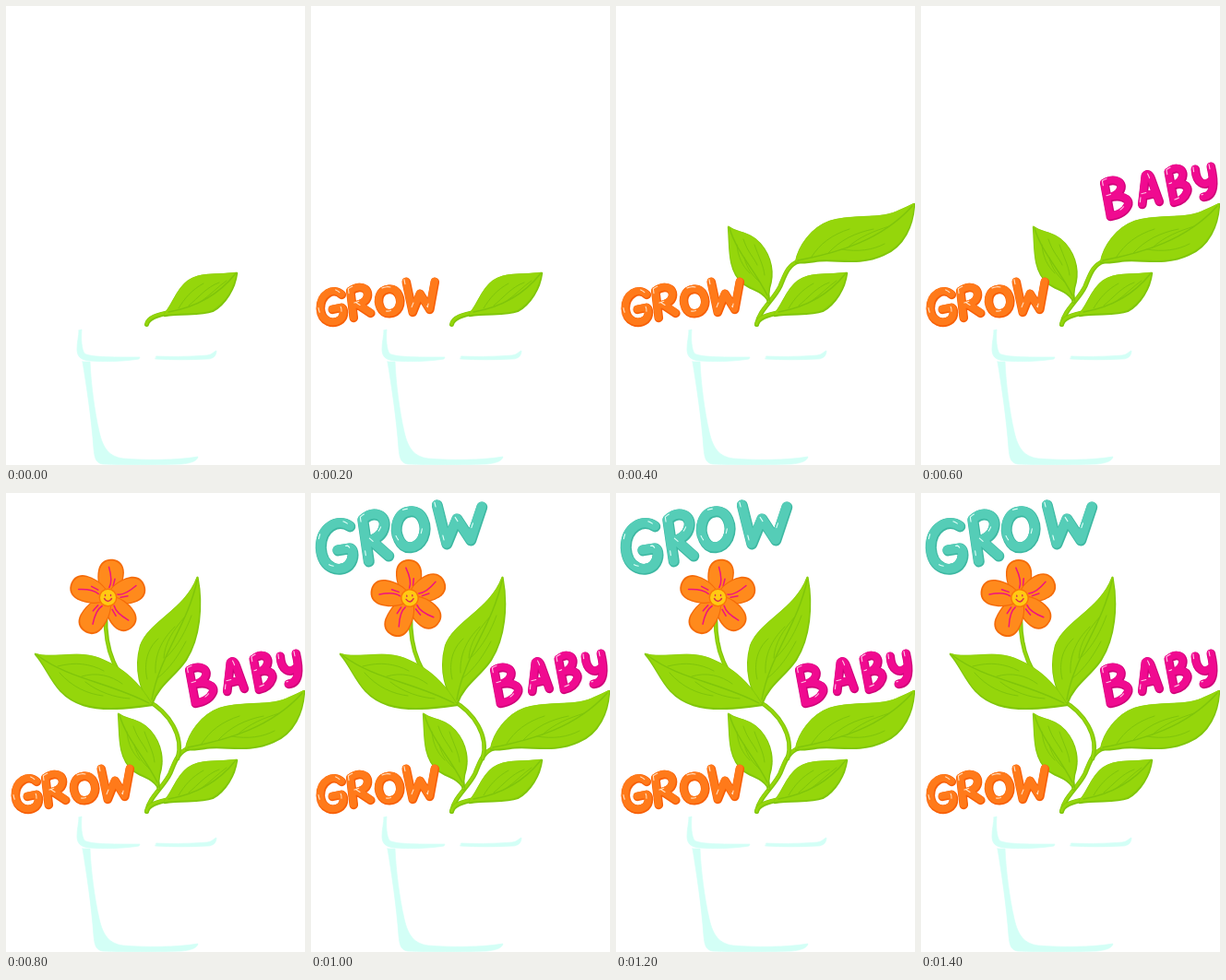
Animation of 324x498 px, one loop 1.6 s. Source, as an HTML page:

```html
<!DOCTYPE html>
<html lang="en">
<head>
<meta charset="utf-8">
<title>Grow baby grow</title>
<style>
html, body { margin: 0; height: 100%; overflow: hidden; background: #fff; }
svg { display: block; width: 100vw; height: 100vh; }
path { stroke-linecap: round; stroke-linejoin: round; }
</style>
</head>
<body>
<svg id="stage" viewBox="0 0 324 498"></svg>
<script>
const LOOP = 1600, STEP = 200;
const GREEN = '#95d60b', SHADE = '#7fc50a', GLASS = '#d3fff6';

// Filled shape with an optional outline of the same colour
const fill = (d, color, edge = 0, extra = '') =>
  `<path d="${d}" fill="${color}" stroke="${color}" stroke-width="${edge}" ${extra}/>`;
const line = (d, color, width, extra = '') =>
  `<path d="${d}" fill="none" stroke="${color}" stroke-width="${width}" ${extra}/>`;
const group = (at, body) => `<g data-at="${at}">${body}</g>`;

const stem = (d, width = 5) =>
  line(d, SHADE, width) + line(d, GREEN, width - 2, 'transform="translate(-.3 -.4)"');

const leaf = (shape, rib, veins) =>
  fill(shape, SHADE, 2.4) +
  fill(shape, GREEN, 0.4, 'transform="translate(-.3 -.9)"') +
  line(rib, SHADE, 1.4) + line(veins, SHADE, 1);

// Puffy lettering: dark edge, bright body, sparse highlight
const letters = (d, width, edge, body, shine) =>
  line(d, edge, width, 'transform="translate(.3 .4)"') +
  line(d, body, width - 1.8, 'transform="translate(-.2 -.4)"') +
  line(d, shine, 1.1, `stroke-dasharray="5 32" transform="translate(${-width * .22} ${-width * .24})"`);

const pot =
  fill('M79 352L82 351C81 362 82 372 85 377C91 381 112 381 145 381L144 383C125 386 105 386 91 385C80 384 77 380 77 372C77 364 79 358 79 352Z', GLASS, 0.7) +
  fill('M163 380C185 381 205 380 218 379C224 378 225 375 228 374C228 379 225 383 218 383C200 384 180 384 162 383Z', GLASS, 0.7) +
  fill('M83 386L91 386C92 410 96 440 101 462C105 480 112 489 127 491C150 493 185 493 208 489C207 494 200 496 190 497C160 498 130 498 105 497C97 496 96 490 95 480C93 450 87 410 83 386Z', GLASS, 0.7);

const lowRight =
  stem('M152.500 345.500C154 338 164 335 178 332.500') +
  leaf('M173 333C181 324 185 308 197 299C211 289 227 293 250 290C248 306 238 323 224 331C211 336 194 333 172 336Z',
    'M176 332C205 327 230 314 249 290',
    'M187 328C193 318 201 308 214 301M198 325C208 317 217 305 231 300M212 320C222 313 229 305 239 298');

const lowLeft = leaf(
  'M122 240C130 247 145 245 156 258C169 273 171 291 166 306L164.500 319C158 308 146 308 137 300C121 286 124 261 122 240Z',
  'M123 241C131 268 151 287 164 314',
  'M131 259C132 272 137 282 145 290M138 253C143 268 149 272 153 281M150 259C155 273 160 282 161 292M139 273C142 286 149 293 156 300');

const midRight = leaf(
  'M195 278C198 261 212 241 232 234C257 226 289 233 308 222C315 219 319 217 323 215C322 238 312 261 290 270C262 283 236 273 215 277C206 278 200 279 195 278Z',
  'M197 276C240 268 288 254 321 217',
  'M212 272C221 258 234 248 253 242M230 268C243 254 259 246 279 242M251 262C264 250 280 244 296 239M245 264C262 267 278 265 291 258');

const topRight = leaf(
  'M207.500 92C213 122 210 157 195 181C183 199 166 207 158 229C146 217 139 191 146 166C155 140 195 127 207.500 92Z',
  'M207 95C197 143 166 177 158 224',
  'M153 202C149 185 153 169 165 158M162 195C161 176 168 160 183 145M171 179C172 163 181 149 194 134M164 201C178 190 187 176 195 161M174 178C187 165 195 149 201 133');

const topLeft = leaf(
  'M32 175C50 182 80 169 106 182C132 193 147 211 158 230C135 233 107 237 84 230C52 220 48 193 32 175Z',
  'M34 176C68 202 111 205 155 228',
  'M56 188C75 183 91 185 106 193M82 199C98 194 114 198 126 207M58 195C72 211 89 218 105 220M86 205C100 216 118 222 134 223');

const trunk = stem('M198 277C186 281 183 292 178 304C171 319 155 330 152.500 345.500') + stem('M164.500 314L165.500 321', 4);
const upper = stem('M108 132C107 168 116 200 153 225C177 238 193 264 186 288', 4.600);

// Petals point along +x before being turned into place: [angle, length]
const petals = [[-83, 42], [-18, 42], [53, 42], [125, 45], [201, 43]].map(([angle, r]) => {
  const shape = `M0 -4C8 -11 18 -15 ${r - 13} -14C${r - 4} -13 ${r} -7 ${r} 0C${r} 7 ${r - 4} 13 ${r - 13} 14C18 15 8 11 0 4Z`;
  return `<g transform="rotate(${angle})">` +
    fill(shape, '#f46a08') +
    fill(shape, '#ff8a1c', 0, 'transform="translate(.8 0) scale(.94 .9)"') +
    line('M11 0C18 3 26 0 33 -3M13 4L21 5', '#ef147f', 1.500) + '</g>';
}).join('');
const flower = `<g id="flower">${petals}
  <circle r="10" fill="#f97608"/><circle r="8.500" fill="#ffc913"/>` +
  `<g id="face">${line('M-4 1Q0 7 4 1M-3 -3V-2M3 -3V-2', '#d82b50', 1.400)}</g></g>`;

const growLow = letters(
  'M33 313C24 304 10 313 10 328C11 343 24 346 32 340C37 335 35 328 33 327L23 329' +
  'M42.500 309L46 338M42.500 309C52 302 63 305 61 315C60 321 52 324 46 325M51 324L64.500 333' +
  'M84 307C74 308 71 318 75 327C79 336 91 335 95 327C99 318 94 306 84 307' +
  'M103 299L110 332L118 312L128.500 329L134 299', 9.600, '#f75e05', '#ff7a1a', '#ffe0c4');

const baby = letters(
  'M198.500 192L205 227M198.500 192C208 186 220 190 216 199C214 205 207 207 203 208C215 204 227 208 224 216C220 225 212 227 205 228' +
  'M239.500 215L243 184Q246 180 249 187L258 212M241 206L254 203' +
  'M268 180L274 212M268 180C276 173 286 176 283 186C281 191 276 194 271 195C282 190 291 194 288 202C285 210 279 212 274 213' +
  'M297 177C298 192 307 197 315 189M314 174C318 191 318 206 306 207', 9.600, '#cf0079', '#f00a90', '#ffc4e5');

const growTop = letters(
  'M42 36C29 27 10.500 37 10.500 59C12 83 32 87 41 78C47 71 46 61 42 60L29 62' +
  'M56 29L62.500 74M56 29C68 18 82 24 79 37C77 47 68 51 60 53M66 52L84 68' +
  'M107 20C94 21 89 38 95 50C101 63 115 61 121 49C127 35 120 18 107 20' +
  'M136.500 13L147 55L158 28L173 51L185 15', 12, '#3db8a2', '#55cdb7', '#e1fff8');

const stage = document.getElementById('stage');
stage.innerHTML = pot +
  group(2, trunk) + group(4, upper) + lowRight +
  group(2, lowLeft + midRight) + group(4, topRight + topLeft + flower) +
  group(1, growLow) + group(3, baby) + group(5, growTop);

const parts = [...stage.querySelectorAll('[data-at]')];
const bloom = document.getElementById('flower');
const face = document.getElementById('face');

// The flower rocks between two poses: [x, y, angle]
const upright = [110.500, 113.500, 0], tilted = [107, 114, -9];

function draw(now) {
  const step = Math.floor(now % LOOP / STEP);
  for (const part of parts) part.style.display = step >= part.dataset.at ? '' : 'none';
  const [x, y, angle] = step % 2 ? tilted : upright;
  bloom.setAttribute('transform', `translate(${x} ${y}) rotate(${angle})`);
  face.setAttribute('transform', `rotate(${-angle / 2})`);
}

const start = performance.now();
function tick() {
  draw(performance.now() - start);
  requestAnimationFrame(tick);
}
tick();
</script>
</body>
</html>
```
